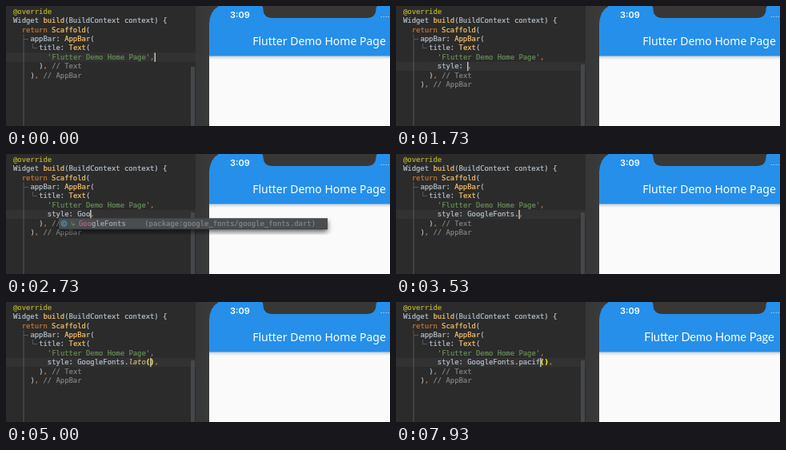
An HTML page that plays this animation: 480x150 px, repeating every 8000 ms.

```html
<!DOCTYPE html>
<html lang="en">
<head>
<meta charset="utf-8">
<title>Typing a text style</title>
<style>
html, body { margin: 0; width: 100%; height: 100%; overflow: hidden; background: #2b2b2b; }
svg { display: block; width: 480px; height: 150px; }
text { white-space: pre; }
.mono { font: 8.9px "DejaVu Sans Mono", monospace; color: #b9c4cf; }
.mono text { fill: currentColor; stroke: currentColor; stroke-width: .18px; }
.mono .key { color: #cc7832; } .mono .fn { color: #ffc66d; } .mono .str { color: #6a9059; }
.mono .note { color: #858585; } .mono .meta { color: #bbb529; } .mono .hit { color: #b0688a; }
.mono .brace { color: #ffef28; font-weight: bold; } .mono .it { font-style: italic; color: #d8b878; }
.mono .item { color: #a8aaac; } .mono .dim { color: #85888a; }
</style>
</head>
<body>
<svg viewBox="0 0 480 150">
  <defs>
    <linearGradient id="side"><stop stop-color="#353637"/><stop offset="1" stop-color="#3a3a3a"/></linearGradient>
    <linearGradient id="drop" x2="0" y2="1"><stop stop-color="#c8cacc"/><stop offset="1" stop-color="#fafafa"/></linearGradient>
    <filter id="blur" x="-10%" y="-20%" width="120%" height="140%"><feGaussianBlur stdDeviation="3"/></filter>
  </defs>
  <rect width="480" height="150" fill="#2b2b2b"/>
  <g id="code" class="mono"></g>
  <rect x="237" width="17" height="150" fill="url(#side)"/>
  <rect x="254" width="226" height="30" fill="#3a3a3a"/>
  <rect x="254" y="30" width="226" height="120" fill="#fafafa"/>
  <rect x="254" y="62" width="226" height="5" fill="url(#drop)"/>
  <path d="M254 62.5V22Q255 6 266 0H480V62.5Z" fill="#258fea"/>
  <path d="M320 0Q321.5 1 321.5 4Q322 15 333 15H451Q462 15 462.5 4Q462.5 1 464 0Z" fill="#383736"/>
  <text x="280" y="14.6" font-family="Inter, sans-serif" font-size="11" font-weight="600" fill="#fff">3:09</text>
  <path d="M468.5 13.5H479" stroke="#9fd0fa" stroke-dasharray="1.5 1.5"/>
  <text id="title" x="391.5" y="49" text-anchor="middle" fill="#fff">Flutter Demo Home Page</text>
  <g id="popup" class="mono"></g>
</svg>
<script>
const LOOP = 8000, CH = 5.358, ROW = 11.4;
const $ = id => document.getElementById(id);
const span = (cls, s) => `<tspan class="${cls}">${s}</tspan>`;
const text = (x, y, s, extra = '') => `<text x="${x}" y="${y}" ${extra}>${s}</text>`;
const rect = (x, y, w, h, fill) => `<rect x="${x}" y="${y}" width="${w}" height="${h}" fill="${fill}"/>`;
const lineY = n => 9.8 + n * ROW;
const col = n => 9 + n * CH;

const type = (name, right) => ({ name: name + ': ,', right });
const lib = (name, file, icon = 'C') => ({ name, icon, right: `(package:${file})` });
const maker = (name, file) => ({ name, icon: 'f', right: `${name} (package:flutter/${file}…` });
const font = name => ({
  name, icon: 'm', right: 'TextStyle',
  tail: `({TextStyle textStyle, FontWeight fontWeight`.slice(0, 42 - name.length) + '…'
});
const fonts = s => s.split(' ').map(font);

const styleArgs = [type('style', 'TextStyle'), type('semanticsLabel', 'String'), type('softWrap', 'bool'),
  type('strutStyle', 'StrutStyle'), type('textScaleFactor', 'double'), type('maxLines', 'int')];
const stArgs = [styleArgs[0], styleArgs[3]];
const cup = 'flutter/cupertino.dart', mat = 'flutter/material.dart', ges = 'GestureDetector';
const gItems = [lib(ges, cup), lib(ges, mat), maker(ges, 'cup'), maker(ges, 'mat'),
  lib('GlobalKey', mat), lib('GlobalKey', cup)];
const goItems = [lib('GoogleFonts', 'google_fonts/google_fonts.dart'), gItems[4], gItems[5]];
const argBox = { x: 48, word: 52, w: 334, right: 367 };
const classBox = { x: 66, word: 91, w: 336, right: 387 };
const fontBox = { x: 130, word: 155, w: 334, right: 449.5 };
const all = fonts('aBeeZee abel abhayaLibre abrilFatface aclonica acme');
const lFonts = fonts('laBelleAurore lacquer laila lakkiReddy lalezar lancelot');
const laFonts = fonts('lato laBelleAurore lacquer laila lakkiReddy lalezar');

// time, typed line ("|" is the caret), popup box, items, matched prefix
const G = 'style: GoogleFonts';
const steps = [
  [0, null],
  [500, '|'],
  [930, 's|', argBox, styleArgs, 's'],
  [1100, 'st|', argBox, stArgs, 'st'],
  [1300, 'sty|', argBox, stArgs, 'sty'],
  [1500, 'styl|', argBox, stArgs, 'styl'],
  [1730, 'style: |,'],
  [2070, 'style: G|,', classBox, gItems, 'g'],
  [2470, 'style: Go|,', classBox, goItems, 'go'],
  [2670, 'style: Goo|,', classBox, goItems.slice(0, 1), 'goo'],
  [2930, 'style: Goog|,', classBox, goItems.slice(0, 1), 'goog'],
  [3200, G + '|,'],
  [3470, G + '.|,'],
  [3730, G + '.|,', fontBox, all, ''],
  [3930, G + '.l|,', fontBox, lFonts, 'l'],
  [4130, G + '.la|,', fontBox, laFonts, 'la'],
  [4330, G + '.lato(|),'],
  [4630, G + '.<lato>(|),'],
  [5730, G + '.<lato>|(),'],
  [5930, G + '.lat|(),'],
  [6000, G + '.la|(),'],
  [6070, G + '.l|(),'],
  [6130, G + '.|(),'],
  [6800, G + '.p|(),'],
  [7070, G + '.pa|(),'],
  [7270, G + '.pac|(),'],
  [7330, G + '.paci|(),'],
  [7400, G + '.pacif|(),']
];

const head = [
  [0, span('meta', '@override')],
  [0, `Widget ${span('fn', 'build')}(BuildContext context) {`],
  [2, `${span('key', 'return')} ${span('fn', 'Scaffold')}(`],
  [4, `appBar: ${span('fn', 'AppBar')}(`],
  [6, `title: ${span('fn', 'Text')}(`],
  [8, span('str', "'Flutter Demo Home Page'") + span('key', ',')]
];
const end = (indent, name) => [indent, `)${span('key', ',')} ${span('note', '// ' + name)}`];

function paint(s) {
  return s.replace('|', '').replace(/<(\w+)>|[(),]/g, (c, name) =>
    name ? span('it', name) : span(c === ',' ? 'key' : 'brace', c));
}

function drawCode(line) {
  const typed = line !== null;
  const row = typed ? 6 : 5;
  const caret = typed ? line.replace(/[<>]/g, '').indexOf('|') : 25;
  const lines = [...head, ...(typed ? [[8, paint(line)]] : []), end(6, 'Text'), end(4, 'AppBar')];
  const top = lineY(row) - 8.4;
  return rect(0, top, 237, ROW, '#323232') +
    '<path d="M22 35V150M22 41.5H28M33.5 47V52.5H39" fill="none" stroke="#606264" stroke-width=".8"/>' +
    lines.map(([n, s], i) => text(col(n), lineY(i), s)).join('') +
    rect(col(8 + caret) - .2, top, 1.2, ROW, '#e4e4e4') +
    rect(231, typed ? 73 : 76, 5, 77, '#45474a');
}

function mark(name, prefix) {
  const i = prefix ? name.toLowerCase().indexOf(prefix) : -1;
  if (i < 0) return name;
  const j = i + prefix.length;
  return name.slice(0, i) + span('hit', name.slice(i, j)) + name.slice(j);
}

function drawIcon(kind, x, y) {
  const color = { C: '#4a8ea8', f: '#b08a3c', m: '#9c5358' }[kind];
  return `<circle cx="${x}" cy="${y}" r="3.5" fill="${color}" fill-opacity=".35" stroke="${color}"/>` +
    text(x, y + 2, kind, `text-anchor="middle" style="font-size:6px;color:${color}"`) +
    rect(x + 10, y, 3.5, 2.5, '#55824c') +
    `<path d="M${x + 9} ${y}v-2h2" fill="none" stroke="#55824c" stroke-width=".9"/>`;
}

function drawPopup(box, items, prefix) {
  if (!box) return '';
  const { x, word, w, right } = box, top = 80.5, H = 12.8, h = items.length * H + 1;
  return `<rect x="${x}" y="${top + 3}" width="${w}" height="${h}" opacity=".6" filter="url(#blur)"/>` +
    rect(x, top, w, h, '#3c3f41') + rect(x, top, w, H, '#4a4d4f') +
    items.map(({ name, icon, tail = '', right: r }, i) => {
      const mid = top + 6.4 + i * H, y = mid + 3.2;
      return (icon ? drawIcon(icon, word - 18.5, mid) : '') +
        text(word, y, mark(name, prefix) + span('dim', tail), 'class="item"') +
        text(right, y, r, 'class="dim" text-anchor="end"');
    }).join('') +
    (items.length > 5 ? rect(x + w - 7, top + 1, 6, 17, '#55585a') : '');
}

let shown;
function frame(now) {
  const t = now % LOOP;
  const lato = t >= 5200;
  const step = steps.findLast(s => t >= s[0]);
  if (step !== shown) {
    shown = step;
    $('code').innerHTML = drawCode(step[1]);
    $('popup').innerHTML = drawPopup(...step.slice(2));
  }
  $('title').style.font = lato ? '14.6px Lato, sans-serif' : '500 14px "Noto Sans", sans-serif';
  requestAnimationFrame(frame);
}
frame(0);
</script>
</body>
</html>
```
